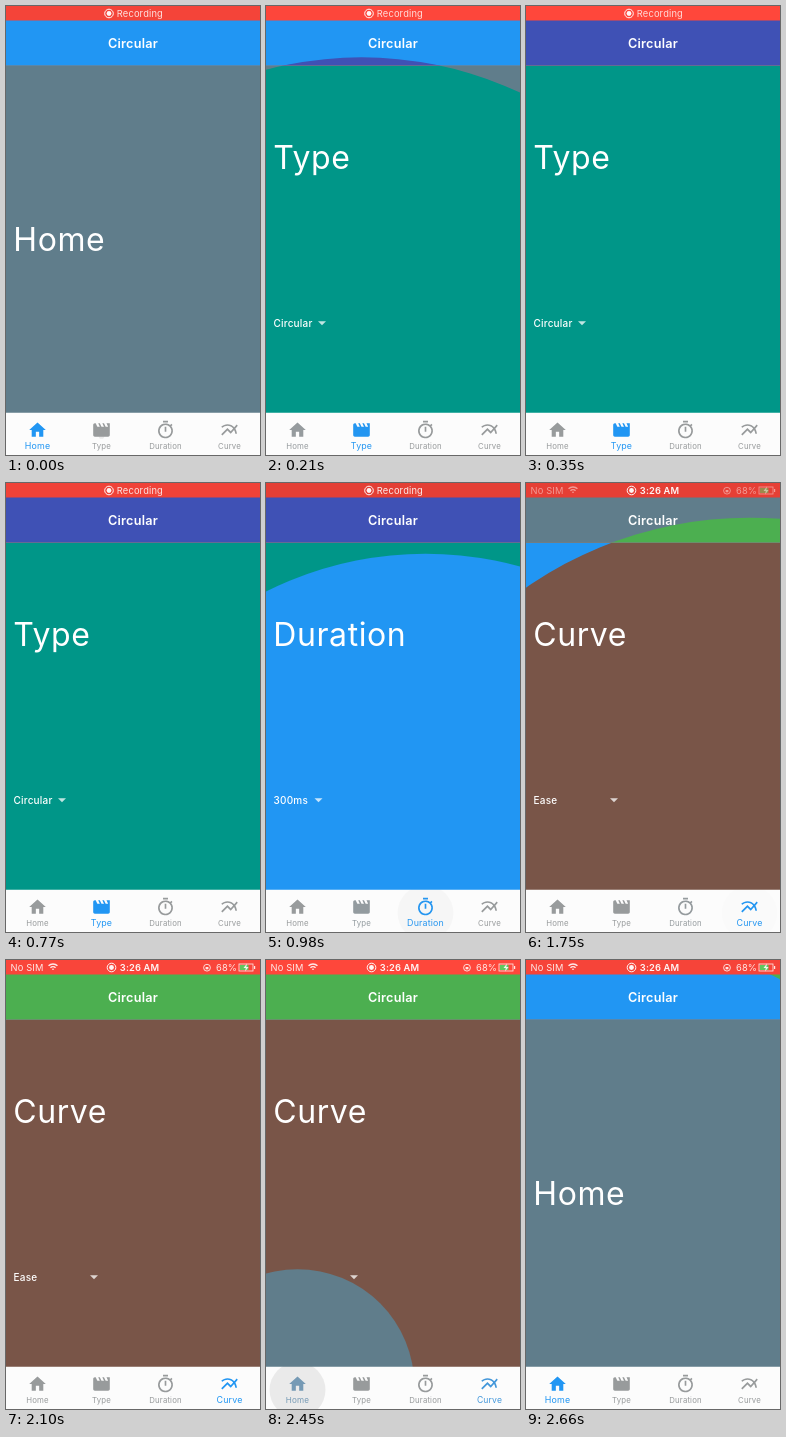
Animation, 254 px wide and 449 px high, one loop 2730 ms. Source, as an HTML page with a canvas:

```html
<!DOCTYPE html>
<html lang="en">
<head>
<meta charset="utf-8">
<style>
html, body { margin: 0; height: 100%; overflow: hidden; background: #fafafa; }
canvas { display: block; }
</style>
</head>
<body>
<canvas id="stage" width="254" height="449"></canvas>
<script>
const W = 254, H = 449, LOOP = 2730, NAV_TOP = 406.5, BAR_TOP = 14.5, ORIGIN_Y = 426;
const ctx = document.getElementById('stage').getContext('2d');

const screens = [
  { name: 'Home', bar: '#2196f3', body: '#607d8b',
    icon: 'M10 20v-6h4v6h5v-8h3L12 3 2 12h3v8z' },
  { name: 'Type', bar: '#3f51b5', body: '#009688', value: 'Circular', arrow: 56,
    icon: 'M18 4l2 4h-3l-2-4h-2l2 4h-3l-2-4H8l2 4H7L5 4H4c-1.1 0-2 .9-2 2v12c0 1.1.9 2 2 2h16c1.1 0 2-.9 2-2V4z' },
  { name: 'Duration', bar: '#607d8b', body: '#2196f3', value: '300ms', arrow: 52.5,
    icon: 'M15 1H9v2h6zM11 14h2V8h-2zM19 7.4l1.4-1.4-1.4-1.4-1.4 1.4A9 9 0 1 0 19 7.4zM12 20a7 7 0 1 1 0-14 7 7 0 0 1 0 14z' },
  { name: 'Curve', bar: '#4caf50', body: '#795548', value: 'Ease', arrow: 88,
    icon: 'M22 6.9l-1.4-1.4-2.9 3.2C15.7 6.4 12.8 5 9.6 5 6.7 5 4.1 6.2 2 8l1.4 1.4C5.1 7.9 7.3 7 9.6 7c2.7 0 5.1 1.3 6.8 3.2l-2.9 3.3-4-4L2 17l1.5 1.5 6-6 4 4 4-4.6c.8 1.4 1.3 2.9 1.5 4.6h2c-.2-2.3-1-4.4-2-6.1z' }
];
screens.forEach((s, i) => { s.x = 31.5 + 64 * i; s.path = new Path2D(s.icon); });

// When each tap starts its reveal, and which screen it opens.
const taps = [[45, 1], [830, 2], [1590, 3], [2397, 0]];

const clamp = v => Math.max(0, Math.min(1, v));
const ramp = (t, from, to) => clamp((t - from) / (to - from));
const mix = (a, b, k) => `rgb(${a.map((v, i) => Math.round(v + (b[i] - v) * k))})`;

function bezier(x1, y1, x2, y2) {
  const at = (a, b, u) => 3 * a * u * (1 - u) ** 2 + 3 * b * u * u * (1 - u) + u ** 3;
  return x => {
    if (x <= 0 || x >= 1) return clamp(x);
    let lo = 0, hi = 1;
    for (let i = 0; i < 24; i++) {
      const mid = (lo + hi) / 2;
      if (at(x1, x2, mid) < x) lo = mid; else hi = mid;
    }
    return at(y1, y2, lo);
  };
}
const ease = bezier(.25, .1, .25, 1), fastOutSlowIn = bezier(.4, 0, .2, 1);

// Letters are tracked in proportion to their size.
function text(str, x, y, size, { weight = 400, align = 'left', color = '#fff' } = {}) {
  ctx.font = `${weight} ${size}px Inter, sans-serif`;
  ctx.letterSpacing = `${size * .018}px`;
  ctx.textAlign = align;
  ctx.fillStyle = color;
  ctx.fillText(str, x, y);
}

function rect(x, y, w, h, color) {
  ctx.fillStyle = color;
  ctx.fillRect(x, y, w, h);
}

function arc(x, y, r, from = 0, to = 2 * Math.PI) {
  ctx.beginPath();
  ctx.arc(x, y, r, from, to);
}

function polygon(color, ...points) {
  ctx.beginPath();
  points.forEach(p => ctx.lineTo(...p));
  ctx.fillStyle = color;
  ctx.fill();
}

function drawScreen(s) {
  rect(0, 14, W, 46, s.bar);
  rect(0, 60, W, H - 60, s.body);
  rect(0, 59, W, 1, 'rgba(125,125,125,.6)');
  text('Circular', 127, 42.2, 12.7, { weight: 600, align: 'center' });
  text(s.name, 7.3, s.value ? 162.7 : 245, 32);
  if (!s.value) return;
  text(s.value, 7.6, 321, 10, { weight: 500 });
  polygon('rgba(255,255,255,.75)', [s.arrow - 4, 315.3], [s.arrow + 4, 315.3], [s.arrow, 319.3]);
}

function drawReveal(s, progress) {
  const reach = Math.hypot(Math.max(s.x, W - s.x), ORIGIN_Y - 15);
  ctx.save();
  arc(s.x, ORIGIN_Y, reach * ease(progress));
  ctx.clip();
  drawScreen(s);
  ctx.restore();
}

function drawSplashes(t) {
  for (const [start, target] of taps) {
    const grow = ramp(t, start - 45, start + 50);
    const alpha = .07 * (1 - ramp(t, start + 120, start + 165));
    if (!grow || !alpha) continue;
    arc(screens[target].x, 430, 28 * Math.sqrt(grow));
    ctx.fillStyle = `rgba(0,0,0,${alpha})`;
    ctx.fill();
  }
}

function drawNav(t, current, previous, elapsed) {
  ctx.save();
  ctx.beginPath();
  ctx.rect(0, NAV_TOP, W, H - NAV_TOP);
  ctx.clip();
  rect(0, NAV_TOP, W, H - NAV_TOP, '#fcfcfc');
  drawSplashes(t);
  const k = fastOutSlowIn(clamp(elapsed / 200));
  for (const s of screens) {
    const active = s === current ? k : s === previous ? 1 - k : 0;
    const color = mix([152, 155, 156], [33, 150, 243], active);
    ctx.save();
    ctx.translate(s.x, 424);
    ctx.scale(.83, .83);
    ctx.translate(-12, -12);
    ctx.fillStyle = color;
    ctx.fill(s.path, 'evenodd');
    ctx.restore();
    text(s.name, s.x, 442.6, 7.8 + 1.1 * active, { align: 'center', color });
  }
  ctx.restore();
}

function drawRecordDot(x) {
  ctx.strokeStyle = ctx.fillStyle = '#fff';
  ctx.lineWidth = 1;
  arc(x, 7.5, 4.3);
  ctx.stroke();
  arc(x, 7.5, 2.4);
  ctx.fill();
}

function drawStatusSides() {
  text('No SIM', 4.5, 11, 9.3);
  ctx.strokeStyle = '#fff';
  ctx.lineWidth = 1.4;
  for (const r of [1, 3.6, 6.3]) {
    arc(47, 10.3, r, -Math.PI * .75, -Math.PI * .25);
    ctx.stroke();
  }
  ctx.lineWidth = .9;
  arc(201, 7.7, 3.4);
  ctx.stroke();
  rect(199.6, 7, 2.8, 2.3, '#fff');
  text('68%', 210, 11, 9.3);
  ctx.lineWidth = .8;
  ctx.strokeRect(233, 4, 14, 7);
  rect(248, 6, 1.2, 3, '#fff');
  rect(234, 5, 8.5, 5, '#4cd964');
  polygon('#fff', [241, 3.5], [237.5, 8], [239.8, 8], [239, 11.5], [242.6, 7], [240.3, 7]);
}

function drawStatus(t) {
  const glow = (1 + Math.cos((t - 350) / 1000 * Math.PI)) / 2;
  rect(0, 0, W, BAR_TOP, mix([216, 59, 50], [255, 71, 59], glow));
  const swap = ramp(t, 1390, 1550);
  ctx.globalAlpha = .95;
  drawRecordDot(103 + 2.5 * swap);
  ctx.globalAlpha = (1 - swap) * (.95 - .15 * glow);
  text('Recording', 110.8, 11, 9.3);
  ctx.globalAlpha = swap * .95;
  text('3:26 AM', 113.8, 11, 9.3, { weight: 600 });
  ctx.globalAlpha = .88 * ramp(t, 1500, 1960);
  drawStatusSides();
  ctx.globalAlpha = 1;
}

function draw(t) {
  let current = screens[0], previous = screens[3], start = -LOOP;
  for (const [time, target] of taps) {
    if (t < time) break;
    previous = current;
    current = screens[target];
    start = time;
  }
  const elapsed = t - start;
  if (elapsed < 300) {
    drawScreen(previous);
    drawReveal(current, elapsed / 300);
  } else {
    drawScreen(current);
  }
  drawNav(t, current, previous, elapsed);
  drawStatus(t);
}

const begin = performance.now();
function frame() {
  draw((performance.now() - begin) % LOOP);
  requestAnimationFrame(frame);
}
frame();
</script>
</body>
</html>
```
